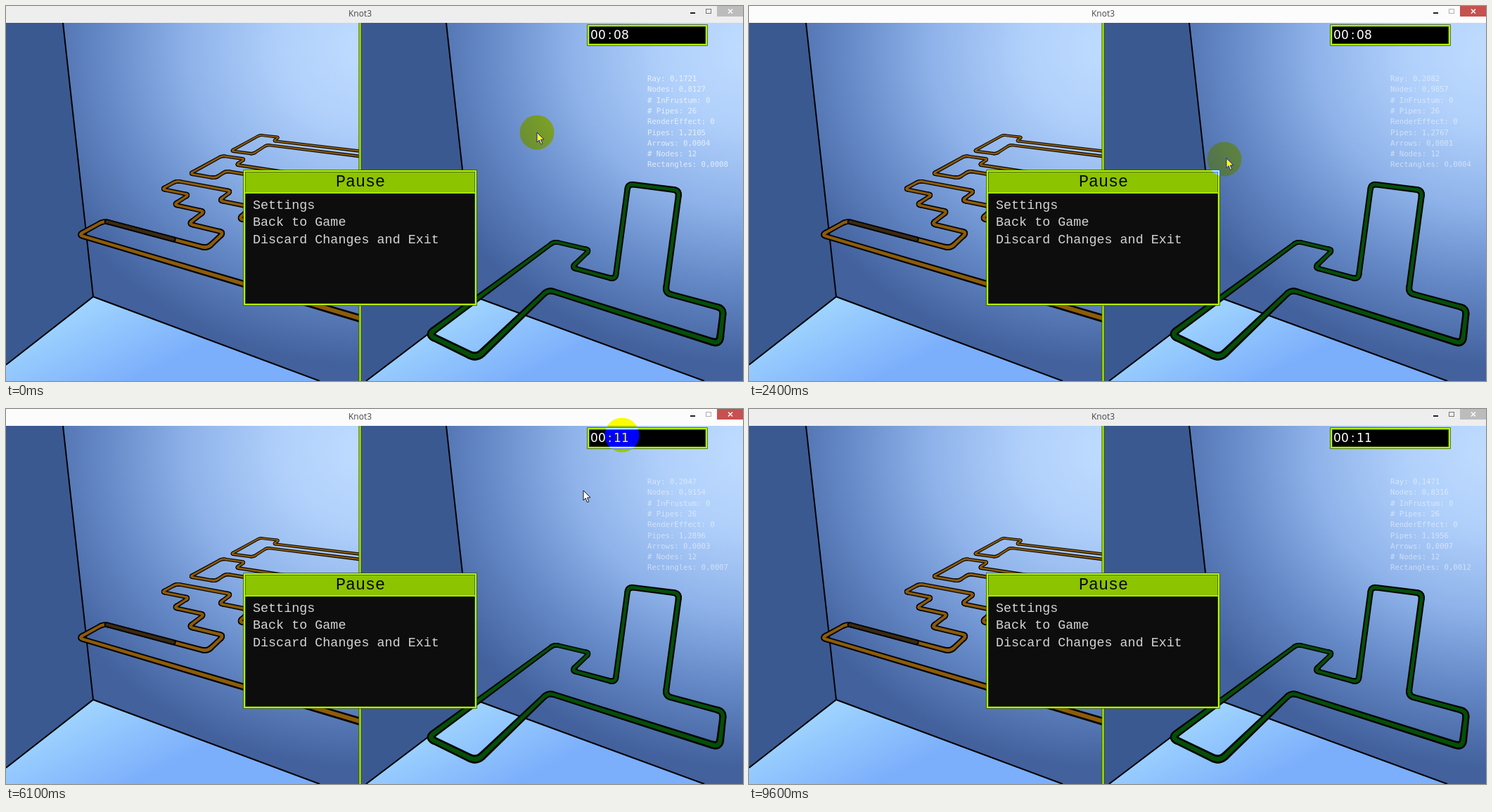
An HTML page with a canvas that plays this animation: 1048 by 534 pixels, repeating every 9700 ms.

```html
<!DOCTYPE html>
<html lang="en">
<head>
<meta charset="utf-8">
<title>Knot3</title>
<style>
html, body { margin: 0; width: 100%; height: 100%; overflow: hidden; background: #fff; }
canvas { display: block; }
</style>
</head>
<body>
<canvas id="stage" width="1048" height="534"></canvas>
<script>
const W = 1048, H = 534, LOOP = 9700, STEP = 100;
const MONO = '"Liberation Mono", monospace';
const LIME = '#b4fa00', LIME_EDGE = '#3b5400';
const stage = document.getElementById('stage').getContext('2d');

// Circle position over time: [ms, x, y]. The pointer trails it by one step.
const POINTER_PATH = [
  [0, 755, 180], [700, 725, 195], [2400, 676, 218], [3500, 674, 228], [3900, 891, 86],
  [4000, 899, 54], [5400, 899, 50], [6000, 821, 116], [6100, 876, 37],
  [7300, 208, 343], [7500, 208, 343], [8900, 700, 565]
];

// Perspective views: image of the grid origin, shift per grid unit, and depth per unit.
const LEFT_VIEW = {
  origin: [103, 326], width: 8,
  right: [39.3, -2.4, -0.0476], back: [47.3, 4.55, 0.08], up: [0, 0, 0]
};
const RIGHT_VIEW = {
  origin: [600, 468], width: 11,
  right: [9, -11.5, -0.09], back: [172, 21.5, 0.163], up: [12, -89, 0]
};
const MOVES = { R: [1, 0, 0], L: [-1, 0, 0], B: [0, 1, 0], F: [0, -1, 0], U: [0, 0, 1], D: [0, 0, -1] };

const mix = (a, b, k) => a.map((v, i) => v + (b[i] - v) * k);

function project(view, [u, v, h]) {
  const along = i => u * view.right[i] + v * view.back[i] + h * view.up[i];
  const depth = 1 + along(2);
  return [(view.origin[0] + along(0)) / depth, (view.origin[1] + along(1)) / depth, view.width / depth];
}

// Follows moves such as "R3 B1" over the grid and returns projected [x, y, width] nodes.
function walk(view, start, moves) {
  let cell = [...start, 0];
  const nodes = [project(view, cell)];
  for (const [direction, count] of moves.split(' ')) {
    cell = cell.map((value, i) => value + MOVES[direction][i] * count);
    nodes.push(project(view, cell));
  }
  return nodes;
}

function tracePolygon(c, points) {
  c.beginPath();
  points.forEach(([x, y]) => c.lineTo(x, y));
  c.closePath();
}

function fillPolygon(c, points, fill) {
  tracePolygon(c, points);
  c.fillStyle = fill;
  c.fill();
}

function line(c, ...points) {
  c.beginPath();
  points.forEach(([x, y]) => c.lineTo(x, y));
  c.strokeStyle = '#000';
  c.lineWidth = 2;
  c.stroke();
}

function text(c, string, x, y, font, color, align = 'left') {
  c.font = font;
  c.fillStyle = color;
  c.textAlign = align;
  c.fillText(string, x, y);
}

function roundCorners(nodes, closed) {
  const samples = [], count = nodes.length;
  nodes.forEach((node, i) => {
    if (!closed && (i === 0 || i === count - 1)) return samples.push(node);
    const toward = other => {
      const distance = Math.hypot(other[0] - node[0], other[1] - node[1]);
      return mix(node, other, Math.min(0.4, node[2] * 0.9 / distance));
    };
    const from = toward(nodes[(i + count - 1) % count]);
    const to = toward(nodes[(i + 1) % count]);
    for (let k = 0; k <= 1; k += 0.125) {
      samples.push(mix(mix(from, node, k), mix(node, to, k), k));
    }
  });
  if (closed) samples.push(samples[0]);
  return samples;
}

function pipe(c, nodes, color, closed = false) {
  const samples = roundCorners(nodes, closed);
  for (const [scale, fill] of [[1, '#050505'], [0.52, color]]) {
    samples.forEach(([x, y, w], i) => {
      c.fillStyle = fill;
      c.beginPath();
      c.arc(x, y, w * scale / 2, 0, Math.PI * 2);
      c.fill();
      if (!i) return;
      const [px, py, pw] = samples[i - 1];
      const length = Math.hypot(x - px, y - py) || 1;
      const nx = (py - y) / length * scale / 2, ny = (x - px) / length * scale / 2;
      fillPolygon(c, [[px + nx * pw, py + ny * pw], [x + nx * w, y + ny * w],
        [x - nx * w, y - ny * w], [px - nx * pw, py - ny * pw]], fill);
    });
  }
}

function room(c, left, right, top, corner, floorLeft, floorRight) {
  c.save();
  c.beginPath();
  c.rect(left, 24, right - left, H - 24);
  c.clip();

  // Back wall with an elliptical glow
  c.save();
  c.translate(right + 12, 60);
  c.scale(460, 410);
  const glow = c.createRadialGradient(0, 0, 0, 0, 0, 1.1);
  ['#c0dcff', '#b0d0fb', '#8fb3ea', '#6488c6', '#42619d'].forEach((color, i, all) =>
    glow.addColorStop(i / (all.length - 1), color));
  c.fillStyle = glow;
  c.fillRect(-3, -3, 6, 6);
  c.restore();

  fillPolygon(c, [[left, 24], top, corner, floorLeft, [left, H]], '#3b5991');
  const floor = c.createLinearGradient(corner[0], corner[1], corner[0] + 60, H);
  floor.addColorStop(0, '#a0d5ff');
  floor.addColorStop(1, '#7baefb');
  fillPolygon(c, [corner, floorRight, [left, H], floorLeft], floor);
  line(c, top, corner);
  line(c, floorLeft, corner, floorRight);
  c.restore();
}

function limeFrame(c, x, y, w, h) {
  for (const [color, width] of [[LIME_EDGE, 3.5], [LIME, 2]]) {
    c.strokeStyle = color;
    c.lineWidth = width;
    c.strokeRect(x, y, w, h);
  }
}

function drawLeftKnot(c) {
  const strand = (u, v, moves, color = '#8e5c08') => pipe(c, walk(LEFT_VIEW, [u, v], moves), color);
  c.save();
  c.beginPath();
  c.rect(0, 24, 502, H);
  c.clip();
  strand(8, 13, 'L7 B1 L1 F4 R1 B2 R7');
  strand(8, 8, 'L7 B1 L1 F3 R1 B1 R7');
  strand(8, 0, 'L8 B1 R3 B1 L1 B1 L1 B1 L1 B1 R2 F1 R1 F1 R2 B1 R3');
  strand(8, 1, 'L3 B1 R1 B1');
  [0, 5].forEach(u => strand(u + 0.1, 1, 'R3'.replace('3', u ? 3 : 2), '#3c2a10'));
  c.restore();
}

function buildScene() {
  const canvas = document.createElement('canvas');
  canvas.width = W;
  canvas.height = H;
  const c = canvas.getContext('2d');
  room(c, 0, 503, [81, 24], [124, 414], [0, 511], [446, 534]);
  room(c, 503, W, [626, 24], [669, 415], [512, 534], [993, 534]);
  drawLeftKnot(c);
  pipe(c, walk(RIGHT_VIEW, [0, 0], 'B4 R1 F1 R1 U2 R1 D2 R1 F1 L3 F2'), '#054f08', true);
  c.fillStyle = LIME_EDGE;
  c.fillRect(501.5, 24, 4, H);
  c.fillStyle = LIME;
  c.fillRect(502.5, 24, 2, H);
  return canvas;
}

function drawTitleBar(c, active) {
  c.fillStyle = active ? '#fcfcfc' : '#eeeeee';
  c.fillRect(0, 0, W, 24);
  text(c, 'Knot3', 503.5, 15, '12px "Open Sans", sans-serif', '#444', 'center');
  c.fillStyle = '#222';
  c.fillRect(973, 9, 7, 2);
  c.strokeStyle = active ? '#b0b0b0' : '#777';
  c.lineWidth = 1;
  c.strokeRect(995.5, 4.5, 7, 6);
  c.fillStyle = active ? '#c75050' : '#bcbcbc';
  c.fillRect(1011, 0, 37, 15);
  c.strokeStyle = '#fff';
  c.lineWidth = 1.5;
  c.beginPath();
  c.moveTo(1027, 4.5); c.lineTo(1033, 10.5);
  c.moveTo(1033, 4.5); c.lineTo(1027, 10.5);
  c.stroke();
}

function drawTimer(c, seconds) {
  c.fillStyle = '#000';
  c.fillRect(827, 27, 169, 28);
  limeFrame(c, 828, 28, 168, 27);
  const label = '00:' + String(seconds).padStart(2, '0');
  [...label].forEach((char, i) =>
    text(c, char, 836.5 + i * 11, 47, '17px "DejaVu Sans", sans-serif', '#fff', 'center'));
}

function drawStatistics(c, t) {
  const tick = Math.floor(t / 200);
  const reading = (base, spread) =>
    (base + spread * Math.sin(tick * (2 + base))).toFixed(4).replace('.', ',');
  const rows = [
    'Ray: ' + reading(0.1721, 0.045),
    'Nodes: ' + reading(0.8127, 0.24),
    '# InFrustum: 0',
    '# Pipes: 26',
    'RenderEffect: 0',
    'Pipes: ' + reading(1.2105, 0.09),
    'Arrows: ' + reading(0.0004, 0.0003),
    '# Nodes: 12',
    'Rectangles: ' + reading(0.0008, 0.0004)
  ];
  const color = `rgba(255,255,255,${t < 1500 ? 0.72 : 0.52})`;
  rows.forEach((row, i) =>
    text(c, row, 912, 107 + i * 15.3, '10.6px "DejaVu Sans Mono", monospace', color));
}

function drawMenu(c) {
  c.fillStyle = '#0d0d0d';
  c.fillRect(338, 234, 330, 191);
  c.fillStyle = '#8cc400';
  c.fillRect(338, 234, 330, 32);
  limeFrame(c, 339, 235, 329, 190);
  c.fillStyle = LIME;
  c.fillRect(339, 265.5, 329, 1.5);
  text(c, 'Pause', 504, 256.5, '23.4px ' + MONO, '#080808', 'center');
  ['Settings', 'Back to Game', 'Discard Changes and Exit'].forEach((item, i) =>
    text(c, item, 351, 288.5 + i * 24.5, '18.4px ' + MONO, '#d4d4d4'));
}

function pointerAt(t) {
  const next = POINTER_PATH.findIndex(key => key[0] > t);
  if (next < 0) return POINTER_PATH.at(-1).slice(1);
  if (next === 0) return POINTER_PATH[0].slice(1);
  const a = POINTER_PATH[next - 1], b = POINTER_PATH[next];
  return mix(a, b, (t - a[0]) / (b[0] - a[0])).slice(1);
}

function drawPointer(c, t) {
  const [x, y] = pointerAt(t - STEP);
  const arrow = [[0, 0], [0, 14], [3.2, 11], [5.5, 16.8], [7.9, 15.8], [5.5, 10.3], [10, 10]];
  tracePolygon(c, arrow.map(([dx, dy]) => [x + dx, y + dy]));
  c.fillStyle = '#fff';
  c.fill();
  c.strokeStyle = '#111';
  c.lineWidth = 1;
  c.stroke();

  // The highlight inverts the blue channel of whatever lies beneath.
  c.globalCompositeOperation = 'difference';
  c.fillStyle = '#00f';
  c.beginPath();
  c.arc(...pointerAt(t), 24.5, 0, Math.PI * 2);
  c.fill();
  c.globalCompositeOperation = 'source-over';
}

const scene = buildScene();

function render(now) {
  const t = Math.floor(now % LOOP / STEP) * STEP;
  const paused = t < 2800 || t >= 5600;
  const seconds = 8 + Math.max(0, Math.min(3, Math.floor((t - 2100) / 1000)));
  stage.drawImage(scene, 0, 0);
  drawTitleBar(stage, t >= 1200 && t < 9500);
  drawStatistics(stage, t);
  drawTimer(stage, seconds);
  if (paused) drawMenu(stage);
  drawPointer(stage, t);
}

const start = performance.now();
function loop() {
  render(performance.now() - start);
  requestAnimationFrame(loop);
}
loop();
</script>
</body>
</html>
```
